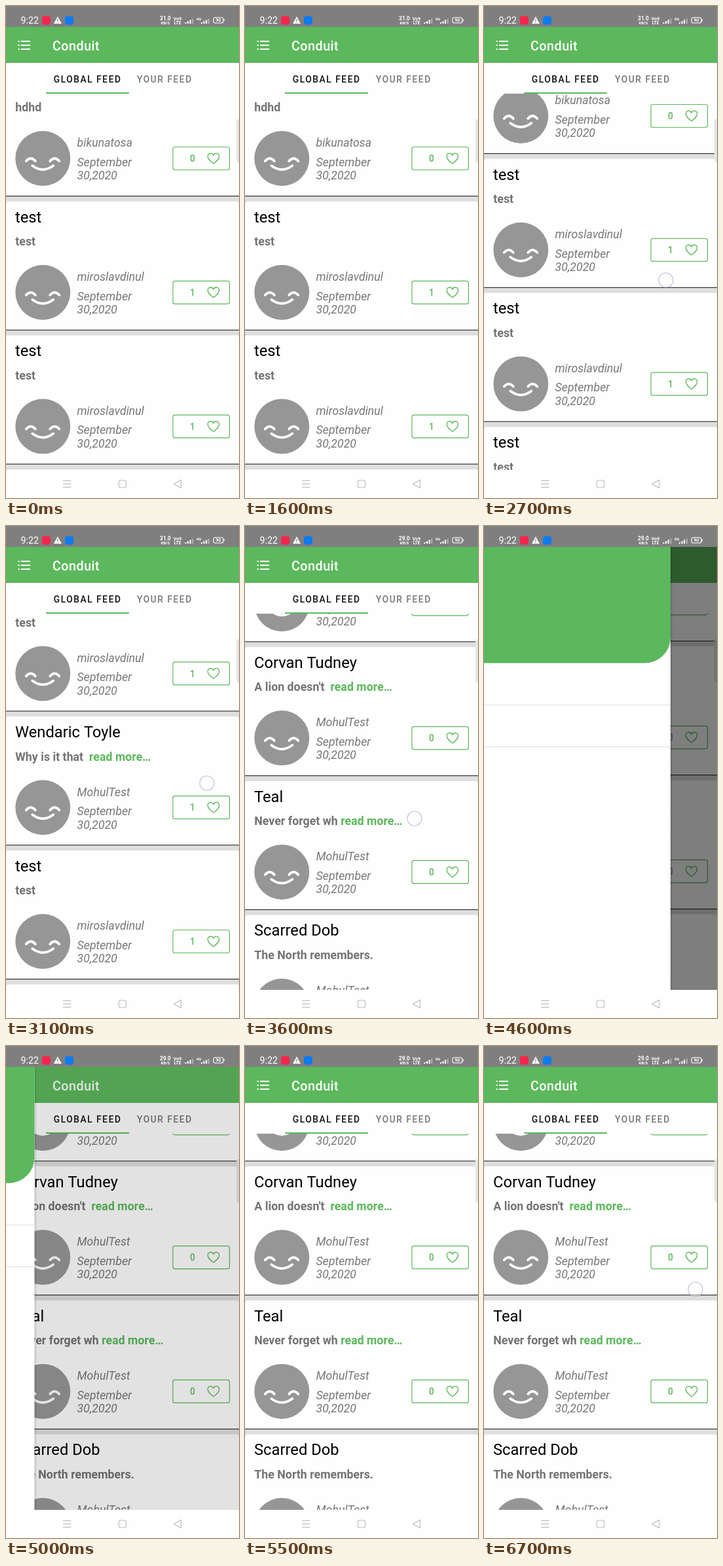
Animation, 356 px wide and 752 px high, one loop 6.8 s. Source, as an HTML page with a canvas:

```html
<!DOCTYPE html>
<html lang="en">
<head>
<meta charset="utf-8">
<title>Feed app</title>
<style>
html, body { margin: 0; width: 356px; height: 752px; overflow: hidden; background: #fff; }
canvas { display: block; width: 356px; height: 752px; }
</style>
</head>
<body>
<canvas id="stage"></canvas>
<script>
const W = 356, H = 752, LOOP = 6800, STEP = 100;
const TOP = 134, BOTTOM = 709, PITCH = 204.8;
const GREEN = '#5cb85c', PAPER = '#fefefe', GREY = '#777';
const FONT = 'Roboto, "Open Sans", sans-serif';

const canvas = document.getElementById('stage');
const ctx = canvas.getContext('2d');
const dpr = window.devicePixelRatio || 1;
canvas.width = W * dpr;
canvas.height = H * dpr;

const plain = { body: 'test', title: 'test', user: 'miroslavdinul', likes: 1 };
const cards = [
  { title: '', body: 'hdhd', user: 'bikunatosa', likes: 0 },
  plain, plain, plain,
  { title: 'Wendaric Toyle', body: 'Why is it that ', more: true, user: 'MohulTest', likes: 1 },
  plain,
  { title: 'Corvan Tudney', body: "A lion doesn't ", more: true, user: 'MohulTest', likes: 0 },
  { title: 'Teal', body: 'Never forget wh', more: true, user: 'MohulTest', likes: 0 },
  { title: 'Scarred Dob', body: 'The North remembers.', user: 'MohulTest', likes: 0 }
];

// Key lists hold [time, value] pairs.
const scrollKeys = [[2500, 0], [2600, 18], [2700, 65], [2900, 345], [3100, 622],
  [3200, 780], [3300, 920], [3400, 1030], [3500, 1105], [3600, 1137.7], [3700, 1138.7]];
const drawerKeys = [[4000, 0], [4100, 125], [4200, 240], [4300, 285], [4700, 285],
  [4800, 205], [4900, 108], [5000, 43.5], [5100, 12], [5200, 0]];
const scrimKeys = [[4000, 0], [4100, 0.18], [4200, 0.4], [4300, 0.5], [4700, 0.5],
  [4800, 0.36], [4900, 0.22], [5000, 0.11], [5200, 0]];
// Touches: start, end, from x, y, to x, y.
const touches = [
  [2600, 2800, 274, 466, 282, 372],
  [3000, 3200, 302, 452, 312, 334],
  [3600, 3700, 259, 447, 259, 447],
  [4000, 4200, 26, 56, 26, 56],
  [6700, 6800, 323, 372, 323, 372]
];

function track(keys, t) {
  if (t <= keys[0][0]) return keys[0][1];
  for (let i = 1; i < keys.length; i++) {
    const [t0, a] = keys[i - 1], [t1, b] = keys[i];
    if (t <= t1) return a + (b - a) * (t - t0) / (t1 - t0);
  }
  return keys[keys.length - 1][1];
}

function rect(x, y, w, h, color) {
  ctx.fillStyle = color;
  ctx.fillRect(x, y, w, h);
}

function round(x, y, w, h, r) {
  ctx.beginPath();
  ctx.roundRect(x, y, w, h, r);
}

function fillRound(x, y, w, h, r, color) {
  round(x, y, w, h, r);
  ctx.fillStyle = color;
  ctx.fill();
}

function stroke(color, width) {
  ctx.strokeStyle = color;
  ctx.lineWidth = width;
  ctx.stroke();
}

function line(x0, y0, x1, y1, color, width) {
  ctx.beginPath();
  ctx.moveTo(x0, y0);
  ctx.lineTo(x1, y1);
  stroke(color, width);
}

function text(str, x, y, style, size, color, spacing = 0, align = 'left') {
  ctx.font = `${style} ${size}px ${FONT}`;
  ctx.letterSpacing = spacing + 'px';
  ctx.textAlign = align;
  ctx.fillStyle = color;
  ctx.fillText(str, x, y);
  return ctx.measureText(str).width;
}

function drawFace(x, y) {
  ctx.beginPath();
  ctx.arc(x, y, 42, 0, Math.PI * 2);
  ctx.fillStyle = '#969696';
  ctx.fill();
  ctx.lineCap = 'round';
  ctx.beginPath();
  for (const ex of [-18.5, 18]) {
    ctx.moveTo(x + ex - 7, y + 4);
    ctx.quadraticCurveTo(x + ex, y - 4, x + ex + 7, y + 4);
  }
  ctx.moveTo(x - 16, y + 11);
  ctx.quadraticCurveTo(x, y + 23, x + 16, y + 11);
  stroke('#fff', 3.8);
  ctx.lineCap = 'butt';
}

function drawHeart(x, y) {
  ctx.beginPath();
  ctx.moveTo(x, y + 8);
  ctx.bezierCurveTo(x - 5, y + 4, x - 8.7, y + 1, x - 8.7, y - 3);
  ctx.bezierCurveTo(x - 8.7, y - 8.5, x - 2.2, y - 9.5, x, y - 4.8);
  ctx.bezierCurveTo(x + 2.2, y - 9.5, x + 8.7, y - 8.5, x + 8.7, y - 3);
  ctx.bezierCurveTo(x + 8.7, y + 1, x + 5, y + 4, x, y + 8);
  stroke(GREEN, 1.3);
}

function drawCard(card, y) {
  rect(0, y + 94, W, PITCH, '#dedede');
  fillRound(0, y + 94, W, 197, [4, 4, 0, 0], PAPER);
  text(card.title, 14, y + 125.7, '400', 23.75, '#000');
  const w = text(card.body, 14.3, y + 161.3, '700', 17.8, '#737373');
  if (card.more) {
    const gap = ctx.measureText(' ').width;
    text('read more…', 14.3 + w + gap, y + 161.3, '700', 17.8, GREEN);
  }
  drawFace(56.3, y + 233);
  text(card.user, 108.5, y + 215.3, 'italic 400', 17.8, GREY);
  text('September', 108.5, y + 244.7, 'italic 400', 17.8, GREY);
  text('30,2020', 108.5, y + 265.3, 'italic 400', 17.8, GREY);
  round(255, y + 215.5, 86.5, 35, 3);
  stroke(GREEN, 1.2);
  text(card.likes, 285, y + 238.2, '500', 13.9, GREEN, 0, 'center');
  drawHeart(317, y + 233);
  rect(0, y + 290, W, 1.1, '#222');
}

function drawFeed(scroll) {
  ctx.save();
  ctx.beginPath();
  ctx.rect(0, TOP, W, BOTTOM - TOP);
  ctx.clip();
  // Each card starts 111 px below the rule of the one before it.
  cards.forEach((card, i) => {
    const y = i * PITCH - scroll;
    if (y > -300 && y < H) drawCard(card, y);
  });
  fillRound(352, 173, 5, 66, 2, '#e6e6e6');
  ctx.restore();
}

function drawHeader() {
  rect(0, 32, W, 55, GREEN);
  for (const y of [54, 60, 66]) {
    rect(18.5, y - 1, 2.2, 2, '#fff');
    rect(23, y - 1, 14, 2, '#fff');
  }
  text('Conduit', 71, 67.6, '500', 19.8, '#fff', 0.45);
  rect(0, 87, W, 47, PAPER);
  text('GLOBAL FEED', 72.8, 116.5, '500', 13.85, '#111', 1.5);
  text('YOUR FEED', 200, 116.5, '500', 13.85, GREY, 1.5);
  rect(61, 132, 127, 2, GREEN);
}

function bars(x, y, n, step) {
  for (let i = 0; i < n; i++) {
    const h = 2 + i * 1.9;
    rect(x + i * step, y - h, 2, h, i < 3 ? '#fff' : '#b4b4b4');
  }
}

function drawStatus(speed) {
  rect(0, 0, W, 32, '#7f7f7f');
  text('9:22', 22.5, 27, '400', 14.2, '#fff');
  fillRound(55, 15.5, 13, 13, 3, '#f5254a');
  ctx.beginPath();
  ctx.moveTo(79, 16);
  ctx.lineTo(85, 27);
  ctx.lineTo(73, 27);
  ctx.closePath();
  ctx.fillStyle = '#fff';
  ctx.fill();
  rect(78.4, 19.5, 1.2, 4, '#7f7f7f');
  rect(78.4, 24.5, 1.2, 1.2, '#7f7f7f');
  fillRound(90, 15.5, 13, 13, 3.5, '#0b7bf0');
  text(speed, 243.5, 21.8, '700', 8.4, '#fff', 0, 'center');
  text('KB/S', 243.5, 27.8, '700', 6, '#fff', 0, 'center');
  text('Vo9', 262, 21.8, '700', 7, '#fff', 0, 'center');
  text('LTE', 262, 27.8, '700', 6.6, '#fff', 0, 'center');
  bars(273.5, 27, 4, 3.6);
  text('4G', 294.5, 21.5, '700', 6, '#fff', 0, 'center');
  bars(298, 27, 4, 3.6);
  round(317, 17.5, 15, 8.5, 3);
  stroke('#fff', 1.1);
  rect(332.6, 20, 1.2, 3.5, '#fff');
  text('90', 324.5, 24.4, '700', 6.8, '#fff', 0, 'center');
}

function drawNav() {
  const c = '#b9b9b9';
  rect(0, BOTTOM, W, H - BOTTOM, PAPER);
  for (const y of [725.5, 730.5, 735.5]) line(87, y, 99.5, y, c, 1.1);
  round(172.5, 725, 11, 11, 2.5);
  stroke(c, 1.1);
  ctx.beginPath();
  ctx.moveTo(256.5, 730.5);
  ctx.lineTo(267.5, 724.5);
  ctx.lineTo(267.5, 736.5);
  ctx.closePath();
  stroke(c, 1.1);
}

function drawDrawer(edge, shade) {
  if (shade > 0) rect(0, 32, W, BOTTOM - 32, `rgba(0,0,0,${shade})`);
  if (edge <= 0) return;
  const x = edge - 285, h = BOTTOM - 32;
  const shadow = ctx.createLinearGradient(edge, 0, edge + 4, 0);
  shadow.addColorStop(0, 'rgba(0,0,0,.16)');
  shadow.addColorStop(1, 'rgba(0,0,0,0)');
  rect(edge, 32, 4, h, shadow);
  rect(x, 32, 285, h, PAPER);
  fillRound(x, 32, 285, 177.5, [0, 0, 39, 0], GREEN);
  for (const y of [273, 337]) rect(x, y, 285, 1, '#dfdfdf');
}

function drawTouch(t) {
  for (const [a, b, x0, y0, x1, y1] of touches) {
    if (t < a || t >= b) continue;
    const p = (t - a) / (b - a);
    ctx.beginPath();
    ctx.arc(x0 + (x1 - x0) * p, y0 + (y1 - y0) * p, 11, 0, Math.PI * 2);
    ctx.fillStyle = 'rgba(255,255,255,.42)';
    ctx.fill();
    stroke('rgba(176,172,208,.7)', 1.2);
  }
}

function draw(t) {
  ctx.setTransform(dpr, 0, 0, dpr, 0, 0);
  rect(0, 0, W, H, PAPER);
  drawFeed(track(scrollKeys, t));
  drawHeader();
  drawDrawer(track(drawerKeys, t), track(scrimKeys, t));
  drawStatus(t < 3300 ? '31.0' : '29.0');
  drawNav();
  drawTouch(t);
}

let start;
function tick(now) {
  if (start === undefined) start = now;
  const t = (now - start) % LOOP;
  draw(Math.floor(t / STEP) * STEP);
  requestAnimationFrame(tick);
}
draw(0);
requestAnimationFrame(tick);
</script>
</body>
</html>
```
